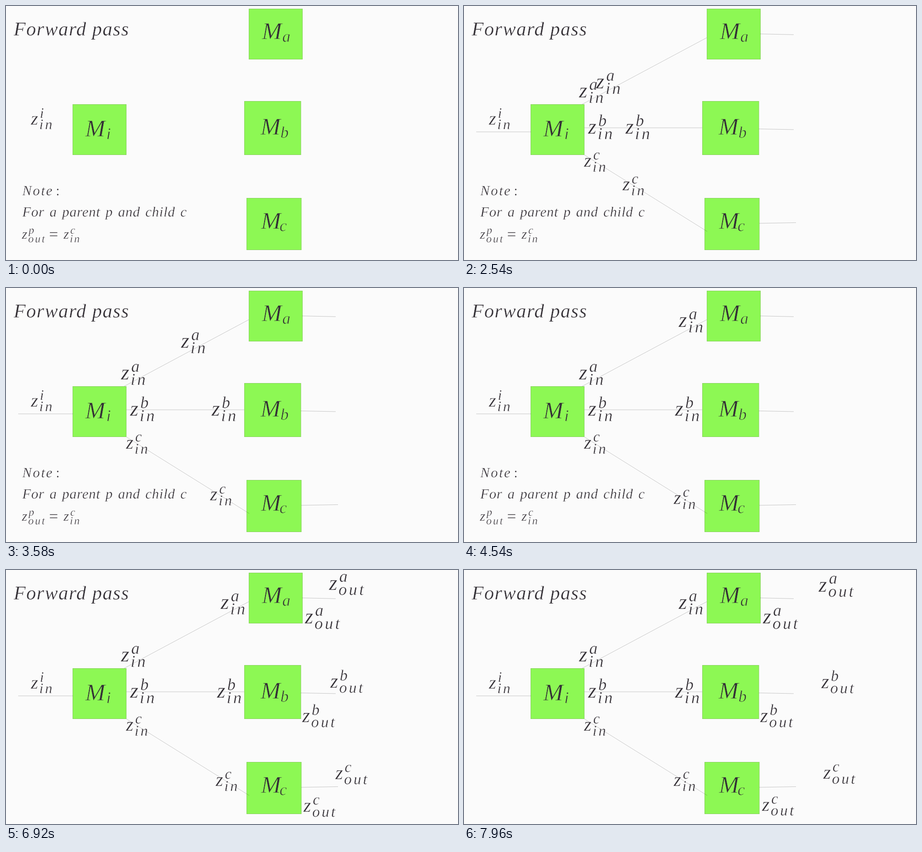
An HTML page for the animation above (8000 ms loop, 998x561 px).

```html
<!DOCTYPE html>
<html lang="en">
<head>
<meta charset="utf-8">
<title>Forward pass</title>
<style>
  html, body { margin: 0; height: 100%; overflow: hidden; background: #fbfbfb; }
  svg { display: block; width: 100%; height: 100%; }
  /* a thin outline in the ground colour gives the letters a lighter weight */
  text {
    font-family: "Liberation Serif", serif; font-style: italic; white-space: pre;
    fill: #343036; stroke: #fbfbfb; stroke-width: .5;
    text-rendering: geometricPrecision;
  }
  rect { fill: #8df854; stroke: #86cf5c; }
  rect + text, rect + text + text { stroke: #8df854; stroke-width: .8; }
  line { stroke: #000; stroke-opacity: .22; }
</style>
</head>
<body>
<svg viewBox="0 0 998 561"></svg>
<script>
const LOOP = 8000, MOVE = 2410, LINES_AT = 40, IN_AT = 2130, OUT_AT = 6130;
const svg = document.querySelector('svg');

function add(parent, tag, attrs, content = '') {
  const el = document.createElementNS('http://www.w3.org/2000/svg', tag);
  for (const key in attrs) el.setAttribute(key, attrs[key]);
  el.textContent = content;
  return parent.appendChild(el);
}

const group = () => add(svg, 'g', {});

function write(parent, x, y, size, content, spacing = 0, style = '') {
  return add(parent, 'text', {
    x, y, 'font-size': size, style: `letter-spacing:${spacing}px;${style}`
  }, content);
}

// z with a superscript and a subscript, placed by the baseline of z
function label(parent, x, y, size, sup, sub) {
  const g = add(parent, 'g', { transform: `translate(${x} ${y})` });
  write(g, 0, 0, size, 'z');
  write(g, size * .48, -size * .37, size * .78, sup);
  write(g, size * .45, size * .25, size * .78, sub, size * .095);
  return g;
}

function box(x, y, w, h, mx, my, sub, sx, sy) {
  add(svg, 'rect', { x, y, width: w, height: h });
  write(svg, mx, my, 53, 'M');
  write(svg, sx, sy, 36, sub);
}

box(536.5, 6.5, 118, 111, 565, 73, 'a', 610, 79);
box(147.5, 217.5, 118, 111, 175, 288, 'i', 221.5, 294);
box(526.5, 210.5, 124.5, 118, 562, 284, 'b', 606, 291);
box(531.5, 424.5, 120.5, 114, 563, 492, 'c', 604, 497);

write(svg, 17, 65, 43, 'Forward pass', 1.4);
label(svg, 55, 262, 41, 'i', 'in');

const note = group();
write(note, 36, 418, 31, 'Note', 2.6);
write(note, 110, 418, 31, ':', 0, 'font-style:normal');
write(note, 36, 465, 31, 'For a parent p and child c', .75, 'word-spacing:3px');
label(note, 35, 514, 31, 'p', 'out');
write(note, 95, 515.5, 36, '=', 0, 'font-style:normal');
label(note, 127, 514, 31, 'c', 'in');

const lines = group();
for (const [x1, y1, x2, y2] of [
  [27, 278, 148, 278], [261, 217, 536, 70], [266, 269, 526, 269], [266, 329, 537, 498],
  [654, 61.7, 728, 63.3], [651, 271.5, 728, 273], [652, 480, 733, 478.5]
]) add(lines, 'line', { x1, y1, x2, y2 });

const linear = t => t;
const easeOut = t => 1 - (1 - t) ** 3;
const movers = [];

function mover(parent, start, from, to, size, sup, sub, ease) {
  movers.push({ el: label(parent, ...from, size, sup, sub), start, from, to, ease });
}

const ins = group();
for (const [sup, size, from, to, ease] of [
  ['a', 47, [254, 202], [474, 86], linear],
  ['b', 47, [274, 282], [466, 282], easeOut],
  ['c', 42, [265, 355], [463, 477], easeOut]
]) {
  label(ins, ...from, size, sup, 'in');
  mover(ins, IN_AT, from, to, size, sup, 'in', ease);
}

const outs = group();
label(outs, 660, 118, 47, 'a', 'out');
label(outs, 654, 336, 44, 'b', 'out');
for (const [sup, size, from, to] of [
  ['c', 43, [656, 535.8], [658.5, 530.3]],
  ['a', 47, [660, 40.5], [822, 49.8]],
  ['b', 44, [660.5, 259.5], [829.5, 262]],
  ['c', 43, [677, 462.5], [830, 461]]
]) mover(outs, OUT_AT, from, to, size, sup, 'out', linear);

const show = (el, on) => el.setAttribute('visibility', on ? 'visible' : 'hidden');

function draw() {
  const now = performance.now() % LOOP;
  show(lines, now >= LINES_AT);
  show(ins, now >= IN_AT);
  show(outs, now >= OUT_AT);
  show(note, now < OUT_AT);
  for (const { el, start, from, to, ease } of movers) {
    const p = ease(Math.min(1, Math.max(0, (now - start) / MOVE)));
    const [x, y] = from.map((v, i) => v + (to[i] - v) * p);
    el.setAttribute('transform', `translate(${x} ${y})`);
  }
  requestAnimationFrame(draw);
}
draw();
</script>
</body>
</html>
```
